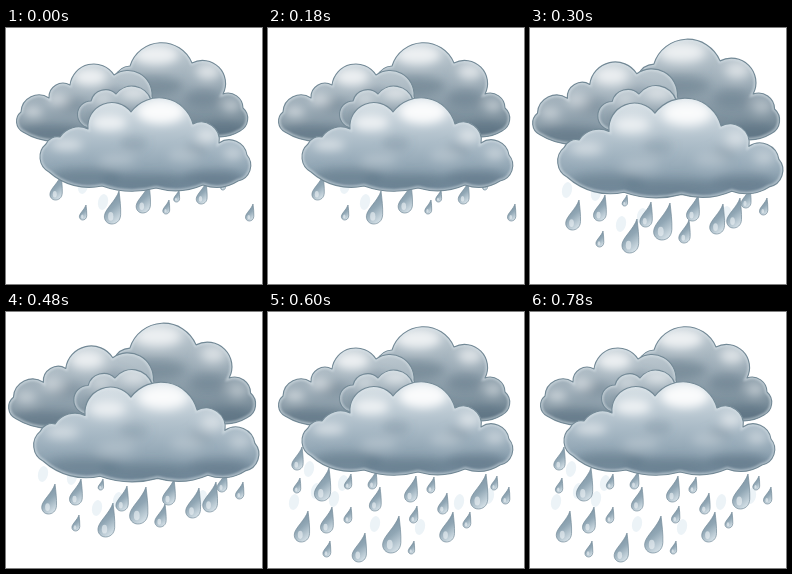
An HTML page that plays this animation: 256 px wide and 256 px high, repeating every 900 ms.

```html
<!DOCTYPE html>
<html lang="en">
<head>
<meta charset="utf-8">
<title>Rain clouds</title>
<style>
  html, body { margin: 0; width: 100%; height: 100%; overflow: hidden; background: #fff; }
  svg { display: block; width: 100vw; height: 100vh; }
</style>
</head>
<body>
<svg id="stage" viewBox="0 0 256 256">
  <defs>
    <linearGradient id="back" x2="0" y2="1">
      <stop offset="0" stop-color="#c3ced5"/>
      <stop offset=".45" stop-color="#9babb6"/>
      <stop offset="1" stop-color="#6b808e"/>
    </linearGradient>
    <linearGradient id="front" x2="0" y2="1">
      <stop offset="0" stop-color="#dce4e9"/>
      <stop offset=".5" stop-color="#a9bac6"/>
      <stop offset=".8" stop-color="#8ca1b0"/>
      <stop offset="1" stop-color="#71889a"/>
    </linearGradient>
    <linearGradient id="water" x1=".2" y1="0" x2=".6" y2="1">
      <stop offset="0" stop-color="#71899a"/>
      <stop offset=".55" stop-color="#91a7b5"/>
      <stop offset="1" stop-color="#d3dfe6"/>
    </linearGradient>
    <filter id="soft" x="-50%" y="-50%" width="200%" height="200%"><feGaussianBlur stdDeviation="5"/></filter>
    <filter id="rim" x="-10%" y="-10%" width="120%" height="120%"><feGaussianBlur stdDeviation="1.2"/></filter>
    <path id="drop" d="M0 0C.03 .25 .06 .5 .05 .72C.04 .92 -.1 1 -.22 1C-.36 1 -.46 .88 -.44 .74C-.42 .55 -.1 .3 0 0Z"/>
  </defs>
  <g id="rain"></g>
  <g id="clouds"></g>
</svg>
<script>
const STEP = 300;
const rain = document.getElementById('rain');
const clouds = document.getElementById('clouds');

// Outline points are [x, y, radius of the arc arriving there]; the last closes the loop.
// Glow and shade are blurred ellipses: [x, y, rx, ry, opacity].
const shapes = [
  {
    fill: 'back',
    edge: [[124, 38, 17], [186, 35, 33], [217, 66, 23], [237, 80, 15], [234, 103, 14], [205, 108, 40], [112, 66, 200]],
    glow: [[150, 27, 23, 10, .75], [202, 44, 12, 8, .6], [225, 78, 9, 6, .45]],
    shade: [[145, 58, 32, 10, .4], [197, 70, 18, 9, .35], [217, 102, 24, 8, .5]]
  },
  {
    fill: 'back',
    edge: [[15, 84, 12], [43, 70, 18], [64, 57, 14], [108, 47, 24], [146, 68, 24], [140, 115, 50], [60, 112, 60], [17, 104, 60]],
    glow: [[84, 49, 17, 9, .75], [52, 72, 10, 6, .5], [27, 84, 10, 5, .55]],
    shade: [[65, 77, 18, 7, .3], [45, 105, 35, 8, .5], [108, 67, 14, 7, .3]]
  },
  {
    fill: 'back',
    edge: [[85, 73, 13], [110, 66, 15], [145, 72, 20], [150, 105, 30], [85, 100, 60]],
    glow: [[97, 72, 9, 6, .4], [128, 66, 13, 6, .5]],
    shade: [[110, 88, 30, 8, .25]]
  },
  {
    fill: 'front',
    edge: [[40, 116, 17], [54, 109, 12], [82, 101, 22], [125, 84, 24], [187, 96, 35], [213, 115, 18],
      [241, 127, 18], [232, 153, 16], [197, 157, 40], [150, 160, 70], [96, 158, 90], [43, 144, 60]],
    glow: [[155, 84, 24, 12, .9], [103, 95, 18, 8, .7], [61, 117, 16, 6, .5], [201, 108, 11, 7, .5],
      [227, 126, 10, 6, .4], [111, 132, 18, 5, .25], [177, 128, 15, 7, .2]],
    shade: [[80, 148, 35, 8, .4], [140, 153, 45, 8, .4], [208, 150, 30, 8, .5], [128, 115, 14, 8, .2], [190, 121, 12, 7, .2]]
  }
];

// Drops are [tip x, tip y, height]; ghosts are faint [x, y].
const phases = [
  {
    scale: 1,
    drops: [[55, 147, 25], [113, 163, 33], [143, 156, 29], [173, 162, 12], [163, 172, 14], [200, 154, 22],
      [219, 152, 10], [247, 176, 17], [80, 177, 15]],
    ghosts: [[77, 158], [97, 174]]
  },
  {
    scale: 1.068,
    drops: [[49, 172, 30], [75, 167, 26], [97, 167, 11], [73, 203, 16], [107, 191, 34], [121, 174, 25],
      [140, 175, 37], [159, 192, 23], [168, 167, 26], [193, 176, 30], [210, 170, 30], [220, 160, 20], [237, 170, 17]],
    ghosts: [[37, 162], [66, 165], [91, 196], [112, 188], [196, 186]]
  },
  {
    scale: 1,
    drops: [[34, 135, 23], [61, 156, 33], [32, 166, 15], [83, 162, 15], [108, 159, 18], [112, 175, 24],
      [40, 199, 31], [64, 195, 26], [83, 195, 16], [62, 229, 16], [97, 221, 29], [131, 204, 37],
      [148, 164, 26], [166, 165, 16], [149, 194, 17], [179, 181, 21], [185, 200, 30], [202, 200, 16],
      [218, 162, 35], [229, 164, 14], [241, 175, 17], [146, 229, 13]],
    ghosts: [[41, 157], [48, 179], [26, 190], [66, 187], [75, 171], [107, 212], [152, 215], [191, 190], [221, 184]]
  }
];

function outline(edge) {
  const [x, y] = edge[edge.length - 1];
  return `M${x} ${y}` + edge.map(([px, py, r]) => `A${r} ${r} 0 0 1 ${px} ${py}`).join('') + 'Z';
}

function blobs(list, color) {
  return list.map(([x, y, rx, ry, o]) =>
    `<ellipse cx="${x}" cy="${y}" rx="${rx}" ry="${ry}" fill="${color}" opacity="${o}"/>`).join('');
}

function cloud({ fill, edge, glow, shade }, i) {
  const d = outline(edge);
  return `<clipPath id="clip${i}"><path d="${d}"/></clipPath>
    <path d="${d}" fill="url(#${fill})"/>
    <g clip-path="url(#clip${i})">
      <g filter="url(#soft)">${blobs(shade, '#4f6779')}${blobs(glow, '#fff')}</g>
      <path d="${d}" fill="none" stroke="#dfe8ed" stroke-width="4" opacity=".55" filter="url(#rim)"/>
    </g>
    <path d="${d}" fill="none" stroke="#738996" stroke-width="1.1" stroke-linejoin="round"/>`;
}

function drop([x, y, h]) {
  return `<g transform="translate(${x} ${y}) scale(${h})">
    <use href="#drop" fill="url(#water)" stroke="#748b9a" stroke-width="${0.7 / h}"/>
    <ellipse cx="-.25" cy=".77" rx=".08" ry=".13" fill="#eef4f7" opacity=".6"/></g>`;
}

function ghost([x, y]) {
  return `<ellipse cx="${x}" cy="${y}" rx="5" ry="8" transform="rotate(12 ${x} ${y})" fill="#e6eff4" opacity=".75"/>`;
}

clouds.innerHTML = shapes.map(cloud).join('');
rain.innerHTML = phases.map(p => `<g>${p.ghosts.map(ghost).join('')}${p.drops.map(drop).join('')}</g>`).join('');

function draw(now) {
  const n = Math.floor(now / STEP) % phases.length;
  [...rain.children].forEach((g, i) => g.setAttribute('display', i === n ? 'inline' : 'none'));
  clouds.setAttribute('transform', `translate(126 66) scale(${phases[n].scale}) translate(-126 -66)`);
}

const start = performance.now();
function tick() {
  draw(performance.now() - start);
  requestAnimationFrame(tick);
}
tick();
</script>
</body>
</html>
```
